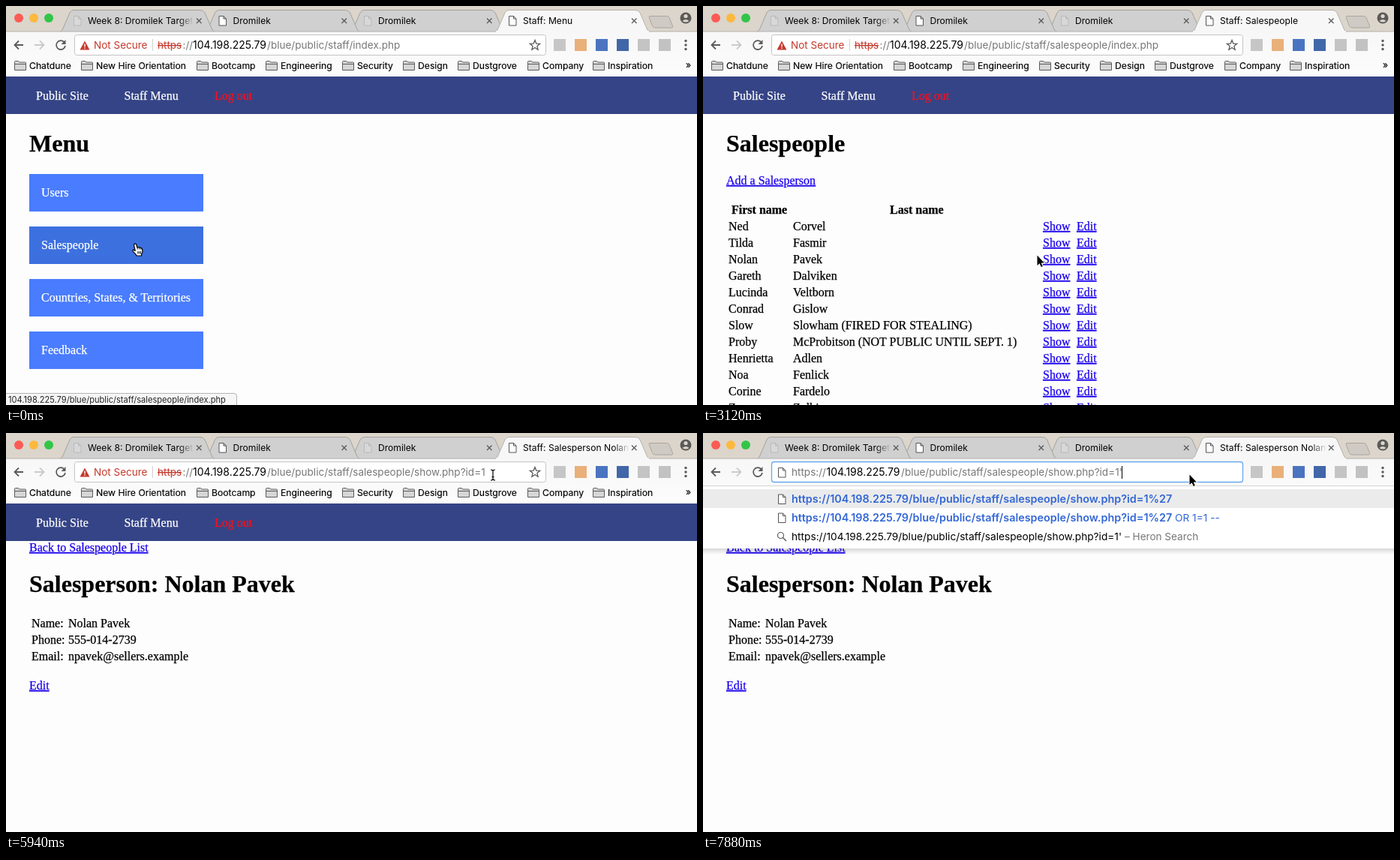
An HTML page that plays this animation: 921 by 532 pixels, repeating every 8 s.

```html
<!DOCTYPE html>
<html lang="en">
<head>
<meta charset="utf-8">
<title>Staff area walkthrough</title>
<style>
html, body { margin: 0; width: 100%; height: 100%; overflow: hidden; background: #fdfdfd; }
svg { display: block; width: 921px; height: 532px; }
text { white-space: pre; font-family: Inter, Roboto, sans-serif; }
.page text { font: 16px "Liberation Serif", "Times New Roman", serif; color: #000; fill: currentColor; stroke: currentColor; stroke-width: .25px; }
.page .h1 { font-size: 32px; font-weight: bold; }
.page .th { font-weight: bold; }
.page .nav { color: #fff; }
.page .out { color: #f8101c; }
.page .link { color: #1a00ee; text-decoration: underline; }
.tab { font-size: 12.1px; }
.mark { font-size: 12.2px; fill: #000; stroke: #000; stroke-width: .15px; }
.url { font-size: 13.55px; fill: #777; }
.host { font-size: 14px; fill: #000; }
.warn { font-size: 13.5px; fill: #c5392c; }
.strike { text-decoration: line-through; }
.tip { font-size: 11.1px; fill: #222; }
.hit { font-size: 14.4px; font-weight: 600; fill: #3367d6; }
.more { font-size: 13.7px; fill: #3367d6; }
.query { font-size: 13.7px; fill: #000; }
.line { fill: none; stroke: #5a5a5a; }
</style>
</head>
<body>
<svg id="stage" viewBox="0 0 921 532">
  <defs>
    <linearGradient id="bar" x1="0" y1="0" x2="0" y2="1">
      <stop stop-color="#f7f7f7"/><stop offset="1" stop-color="#fcfcfc"/>
    </linearGradient>
    <linearGradient id="shade" x1="0" y1="0" x2="0" y2="1">
      <stop stop-color="#000" stop-opacity=".15"/><stop offset="1" stop-color="#000" stop-opacity="0"/>
    </linearGradient>
    <linearGradient id="fadeA" gradientUnits="userSpaceOnUse" x1="230" y1="0" x2="250" y2="0">
      <stop/><stop offset="1" stop-opacity="0"/>
    </linearGradient>
    <linearGradient id="fadeB" gradientUnits="userSpaceOnUse" x1="810" y1="0" x2="831" y2="0">
      <stop/><stop offset="1" stop-opacity="0"/>
    </linearGradient>
  </defs>
  <g id="body" class="page"></g>
  <g id="status">
    <path d="M-1 516.5H304Q307.5 516.5 307.5 520V533H-1Z" fill="#f6f6f6" stroke="#b4b4b4"/>
    <text id="tip" class="tip" x="3" y="529"></text>
  </g>
  <g id="chrome"></g>
  <g id="drop"></g>
  <g id="cursor">
    <g id="hand">
      <path d="M3 1.5Q4.5 .3 5.6 1.8L7 6.2Q8.2 5 9.4 6Q10.6 5.3 11.6 6.6Q13.2 6.4 13.6 8.2L14 12 12.6 15V17H6.2L4.6 14.6 1.2 11.2Q.2 9.4 2.2 9.2L4.2 10.4 2.6 3Q2.4 2 3 1.5Z" fill="#fff" stroke="#000" stroke-width="1.2" stroke-linejoin="round"/>
      <path d="M7 6.2L7.4 8.5M9.4 6L9.8 8.5M11.6 6.6L12 8.8M7.8 11V14.5M9.7 11V14.5M11.5 11V14.5" stroke="#000" fill="none" stroke-width=".9"/>
    </g>
    <path id="arrow" d="M.5 .5V14L3.6 11.200 5.800 16 7.800 15.100 5.700 10.400H9.800Z" stroke="#fff" paint-order="stroke" stroke-width="1.6"/>
    <path id="beam" d="M-3 -7Q0 -7 0 -5Q0 -7 3 -7M0 -5.5V5.5M-3 7Q0 7 0 5Q0 7 3 7M-1.5 2.5H1.5" fill="none" stroke="#000" stroke-width="1.2"/>
  </g>
</svg>
<script>
const $ = id => document.getElementById(id);
const text = (x, y, s, cls = '', extra = '') =>
  `<text x="${x}" y="${y}" class="${cls}" ${extra}>${s.replace(/&/g, '&amp;')}</text>`;
const rect = (x, y, w, h, fill, extra = '') =>
  `<rect x="${x}" y="${y}" width="${w}" height="${h}" fill="${fill}" ${extra}/>`;
const path = (d, extra = 'class="line"') => `<path d="${d}" ${extra}/>`;
const circle = (x, y, r, fill) => `<circle cx="${x}" cy="${y}" r="${r}" fill="${fill}"/>`;
const group = (id, s) => `<g id="${id}">${s}</g>`;

const HOST = '104.198.225.79';
const DIR = '/blue/public/staff/';
const SHOW = DIR + 'salespeople/show.php?id=1';
const PAGES = {
  menu: { title: 'Staff: Menu', path: DIR + 'index.php' },
  list: { title: 'Staff: Salespeople', path: DIR + 'salespeople/index.php' },
  show: { title: 'Staff: Salesperson Nolan Pavek', path: SHOW }
};
const PEOPLE = `Ned,Corvel;Tilda,Fasmir;Nolan,Pavek;Gareth,Dalviken;Lucinda,Veltborn;Conrad,Gislow;
Slow,Slowham (FIRED FOR STEALING);Proby,McProbitson (NOT PUBLIC UNTIL SEPT. 1);Henrietta,Adlen;
Noa,Fenlick;Corine,Fardelo;Zenna,Zolbin`.split(';').map(p => p.trim().split(','));

function drawPages() {
  const button = (s, i) =>
    rect(31, 224 + 70 * i, 232, 50, i === 1 ? '#3d70df' : '#497cfe') + text(47, 254 + 70 * i, s, 'nav');
  const row = ([first, last], i) => {
    const y = 299 + 22 * i;
    return text(34, y, first) + text(120, y, last) + text(453, y, 'Show', 'link') + text(498, y, 'Edit', 'link');
  };
  const field = ([label, value], i) => text(34, 259 + 22 * i, label) + text(83, 259 + 22 * i, value);

  $('body').innerHTML =
    rect(0, 94, 921, 50, '#354486') +
    text(40, 125, 'Public Site', 'nav') + text(157.5, 125, 'Staff Menu', 'nav') + text(278, 125, 'Log out', 'out') +
    group('menu', text(31, 194, 'Menu', 'h1') +
      ['Users', 'Salespeople', 'Countries, States, & Territories', 'Feedback'].map(button).join('')) +
    group('list', text(31, 194, 'Salespeople', 'h1') + text(31, 238, 'Add a Salesperson', 'link') +
      text(38, 277, 'First name', 'th') + text(249, 277, 'Last name', 'th') + PEOPLE.map(row).join('')) +
    group('show', text(31, 158, 'Back to Salespeople List', 'link') +
      text(31, 212, 'Salesperson: Nolan Pavek', 'h1') +
      [['Name:', 'Nolan Pavek'], ['Phone:', '555-014-2739'], ['Email:', 'npavek@sellers.example']].map(field).join('') +
      text(31, 342, 'Edit', 'link'));
}

const doc = (x, y, opacity = 1) =>
  path(`M${x} ${y}h6l3.5 3.5v9h-9.5zM${x + 6} ${y}v3.5h3.5`, `fill="#fff" stroke="#555" opacity="${opacity}"`);

function drawTab(x, title, active, dim, id = '') {
  const d = `M${x} 34Q${x + 2.5} 33.5 ${x + 3.5} 31L${x + 13} 9Q${x + 15} 5.5 ${x + 18} 5.5` +
    `H${x + 187}Q${x + 191} 5.5 ${x + 193} 9L${x + 202.5} 31Q${x + 203.5} 33.5 ${x + 206} 34`;
  const fade = active ? 'url(#fadeB)' : x < 100 ? 'url(#fadeA)' : '#000';
  return path(d, `fill="${active ? '#f7f7f7' : '#d0d0d0'}" stroke="${active ? '#b5b2ad' : '#a5a29d'}"`) +
    doc(x + 18.5, 13.5, dim ? .18 : 1) +
    text(x + 37, 24, title, 'tab', `fill="${fade}" id="${id}"`) +
    path(`M${x + 182} 16.5l6.5 6.5m0 -6.5l-6.5 6.5`, 'class="line" stroke-width="1.3"');
}

function drawChrome() {
  const folder = x => path(`M${x}.5 85.5V74.5q0 -1 1 -1h4l1.5 1.5h7.5q1 0 1 1v9.5zM${x}.5 77.5h15`,
    'fill="#d6d6d6" stroke="#5c5c5c"');
  const marks = { 'Chatdune': 11, 'New Hire Orientation': 100, 'Bootcamp': 254, 'Engineering': 346,
    'Security': 448, 'Design': 529, 'Dustgrove': 602, 'Company': 695, 'Inspiration': 782 };
  const icon = (fill, i) => rect(730 + 28 * i, 44, 16, 16, fill);
  const star = Array.from({ length: 10 }, (_, i) => {
    const r = i % 2 ? 3 : 7, a = Math.PI * (i / 5 - .5);
    return `${(705 + r * Math.cos(a)).toFixed(1)} ${(52.5 + r * Math.sin(a)).toFixed(1)}`;
  }).join('L');

  $('chrome').innerHTML =
    rect(0, 0, 921, 34, '#dbd5cb') +
    circle(17, 16, 6, '#fc5b55') + circle(37, 16, 6, '#fdb93e') + circle(57, 16, 6, '#32c548') +
    drawTab(459, 'Dromilek', false, true) + drawTab(265.5, 'Dromilek', false, false) +
    drawTab(72, 'Week 8: Dromilek Targets', false, true) +
    path('M858 13.5h23q2 0 3 2l4.5 11q1 2.5 -1.5 2.5h-22q-2.5 0 -3.5 -2.5l-4 -10q-1 -3 .5 -3z', 'fill="#cfcbc4" stroke="#aaa69f"') +
    circle(906, 16, 7.5, '#5b5a58') + circle(906, 13.5, 2.6, '#dbd5cb') +
    path('M901.5 20q4.5 -4 9 0q-4.5 3 -9 0z', 'fill="#dbd5cb"') +
    rect(0, 34, 921, 60, 'url(#bar)') + rect(0, 33.5, 921, 1, '#b5b2ad') +
    drawTab(652, '', true, false, 'title') + rect(653, 33, 204, 2, '#f7f7f7') +
    path('M23 52H11.5M17 46.5L11.5 52l5.5 5.5', 'class="line" stroke-width="1.8"') +
    path('M38 52h12.5M45 46.5l5.5 5.5l-5.5 5.5', 'fill="none" stroke="#cacaca" stroke-width="1.8"') +
    path('M77.5 48A6 6 0 1 0 79 53', 'class="line" stroke-width="1.7"') + path('M79.5 45v6h-6z', 'fill="#5a5a5a"') +
    rect(91.5, 38.5, 628, 27, '#fff', 'id="box" rx="3"') +
    group('secure',
      rect(202, 43, 438, 18, '#b3d7fe', 'id="select"') +
      path('M105 46.5L111.5 58.5H98.5z', 'fill="#c5392c"') + rect(104.3, 50.5, 1.4, 4, '#fff') + rect(104.3, 55.5, 1.4, 1.4, '#fff') +
      text(117, 57, 'Not Secure', 'warn') + rect(195, 44, 1, 16, '#d0d0d0') +
      text(202, 57, 'https', 'warn strike') + text(235.5, 57, '://', 'url') +
      text(249, 57, HOST, 'host') + text(348, 57, '', 'url', 'id="path"') +
      rect(639, 44, 1, 17, '#000', 'id="caret"') +
      path(`M${star}Z`, 'class="line" stroke-width="1.3"')) +
    group('edit', doc(100.5, 46.5) +
      text(118, 57, 'https://', 'url') + text(164.5, 57, HOST, 'host') + text(264, 57, SHOW + "'", 'url') +
      rect(558, 44, 1, 17, '#000')) +
    ['#c6c6c6', '#e9b07a', '#4a74c0', '#4267a8', '#c4c4c4', '#c2c2c2'].map(icon).join('') +
    [46.5, 52, 57.5].map(y => circle(906, y, 1.7, '#5a5a5a')).join('') +
    Object.entries(marks).map(([s, x]) => folder(x) + text(x + 20, 84, s, 'mark')).join('') +
    text(906, 83, '»', 'mark');
}

function drawDrop() {
  const link = 'https://' + HOST + SHOW;
  $('drop').innerHTML =
    rect(0, 154, 921, 8, 'url(#shade)') + rect(0, 70, 921, 84, '#fff') + rect(0, 70, 921, 1, '#d2d2d2') +
    rect(0, 75, 921, 25, '#ebebeb') +
    doc(100.5, 82) + text(118, 93, link + '%27', 'hit') +
    doc(100.5, 107) + text(118, 118, link + '%27', 'hit') + text(629, 118, 'OR 1=1 --', 'more') +
    '<circle cx="103.5" cy="136.5" r="4" class="line" stroke-width="1.2"/>' +
    path('M106.5 139.5l4.5 4.5', 'class="line" stroke-width="1.5"') +
    text(118, 143, link + "'", 'query') + text(562, 143, '– Heron Search', 'url');
}

// Each step holds until the next one begins.
const CURSOR = [
  [0, 'hand', 168, 316], [150, 'hand', 162, 317],
  [2090, 'arrow', 190, 322], [2240, 'arrow', 240, 327], [2380, 'arrow', 280, 328], [2530, 'arrow', 301, 328],
  [2830, 'arrow', 375, 331], [2980, 'arrow', 425, 332], [3120, 'arrow', 445, 332], [3270, 'hand', 460, 335],
  [3420, 'hand', 465, 339],
  [5050, 'arrow', 510, 285], [5200, 'arrow', 565, 205], [5350, 'arrow', 590, 165],
  [5650, 'arrow', 594, 126], [5790, 'arrow', 613, 75], [5940, 'beam', 649, 56], [6390, 'arrow', 648, 55]
];
const PAGE = [[0, 'menu'], [1190, 'list'], [4460, 'show']];
const WAIT = `Waiting for ${HOST}...`;
const STATUS = [
  [0, HOST + PAGES.list.path, 1], [750, WAIT, 1], [1790, '', 0],
  [3420, HOST + DIR + 'salespeople/show.php...', 1], [4610, HOST + DIR + 'salespeople/show.php...', .3], [4760, '', 0]
];
const BAR = [[0, 'idle'], [6390, 'selected'], [6980, 'caret'], [7580, 'focus'], [7880, 'edit']];

const at = (steps, t) => steps.findLast(s => s[0] <= t);
const show = (id, on) => $(id).style.display = on ? '' : 'none';

function render(t) {
  const [, kind, x, y] = at(CURSOR, t);
  ['hand', 'arrow', 'beam'].forEach(k => show(k, k === kind));
  $('cursor').setAttribute('transform', `translate(${x} ${y})`);

  const page = at(PAGE, t)[1];
  Object.keys(PAGES).forEach(k => show(k, k === page));
  $('title').textContent = PAGES[page].title;
  $('path').textContent = PAGES[page].path;

  const [, tip, alpha] = at(STATUS, t);
  $('tip').textContent = tip;
  $('status').style.opacity = alpha;

  const bar = at(BAR, t)[1];
  $('box').setAttribute('stroke', bar === 'idle' ? '#c4c4c4' : '#68aaee');
  $('box').setAttribute('stroke-width', bar === 'idle' ? 1 : 1.3);
  show('select', bar === 'selected');
  show('caret', bar === 'caret');
  show('secure', bar !== 'edit');
  show('edit', bar === 'edit');
  show('drop', bar === 'edit');
}

drawPages();
drawChrome();
drawDrop();
const start = performance.now();
function tick() {
  render((performance.now() - start) % 8000);
  requestAnimationFrame(tick);
}
tick();
</script>
</body>
</html>
```
